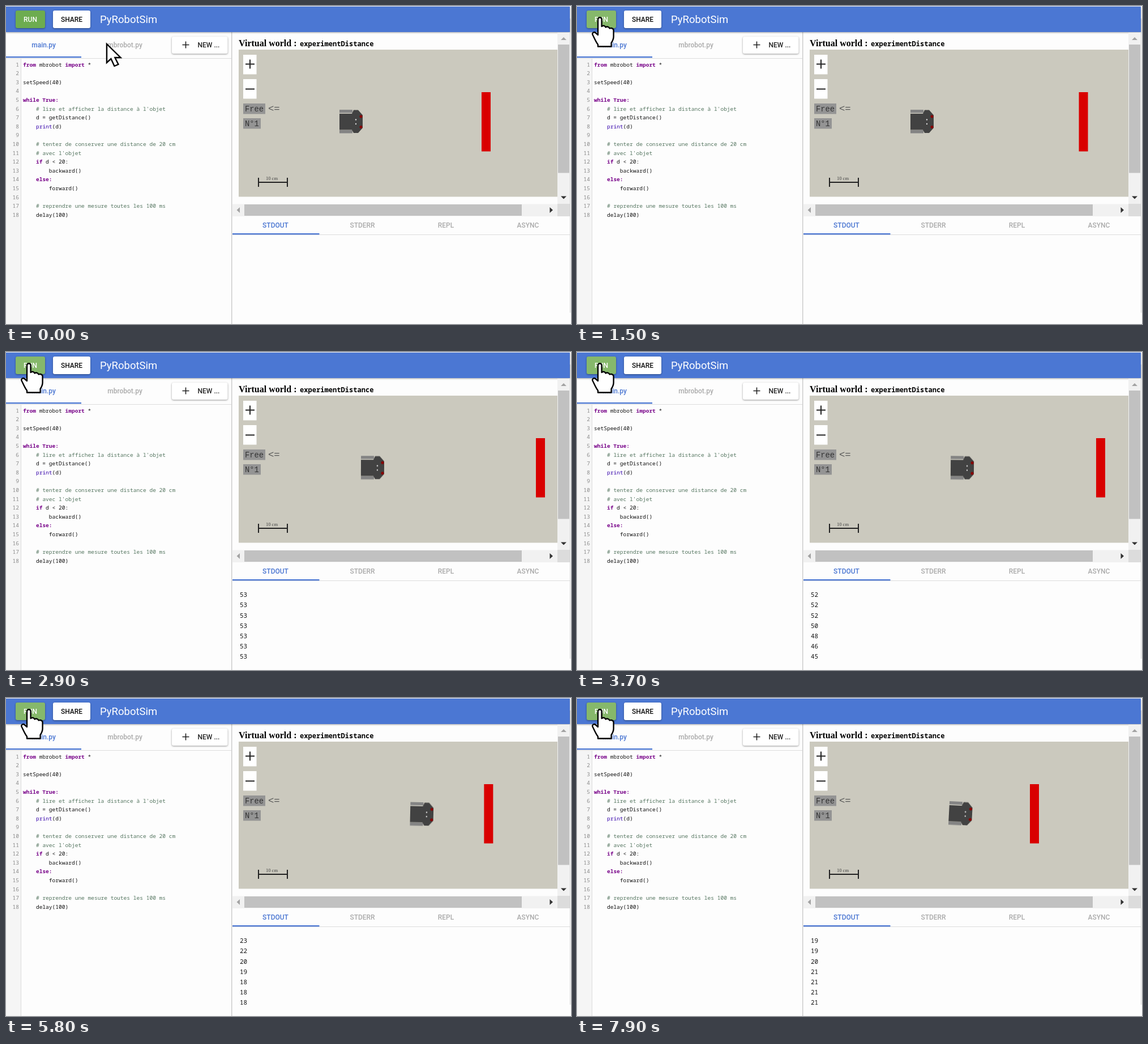
An HTML page that plays this animation: 998 by 561 pixels, repeating every 8000 ms.

```html
<!DOCTYPE html>
<html lang="en">
<head>
<meta charset="utf-8">
<title>PyRobotSim</title>
<style>
html, body { margin: 0; width: 100%; height: 100%; overflow: hidden; background: #fdfdfd; }
#stage { position: absolute; left: 0; top: 0; width: 998px; height: 561px; overflow: hidden; }
svg, pre { position: absolute; left: 0; top: 0; margin: 0; }
.ui { font: 500 12px Roboto, sans-serif; text-anchor: middle; }
.mono { font-family: "Noto Sans Mono", monospace; }
.tag { font: 13.8px "Liberation Mono", monospace; fill: #333; }
.blue { fill: #4a76d2; }
.grey { fill: #aaa; }
.raised { filter: drop-shadow(0 1px 1.5px rgba(0, 0, 0, .4)); }

pre { font: 9.55px/15.59px "Noto Sans Mono", monospace; color: #111; }
#lines { top: 95.7px; width: 23px; text-align: right; color: #8c8c8c; }
#code { top: 95.7px; left: 30px; }
#code b { color: #708; }
#code i { color: #54755f; font-style: normal; }
#code u { color: #30a; text-decoration: none; }
#out { left: 413px; font-size: 10.9px; line-height: 18.2px; }

#wall, #robot, #cursor, #arrow, #hand, #run, #share { animation: 8s linear infinite; }
#wall { animation-name: wall; }
#robot { animation-name: robot; transform-origin: 609.5px 204px; }
#cursor { animation-name: cursor; }
#arrow { animation-name: arrow; }
#hand { animation-name: hand; }
#run { animation-name: run; }
#share { animation-name: share; }

@keyframes wall {
  0% { transform: translateX(840px); }
  10% { transform: translateX(865.3px); }
  11.25% { transform: translateX(869.5px); }
  22.5% { transform: translateX(895px); }
  27.5% { transform: translateX(907px); }
  33.75% { transform: translateX(928px); }
  36.88%, 39.38% { transform: translateX(938px); }
  45% { transform: translateX(921.5px); }
  46.25% { transform: translateX(917px); }
  56.25% { transform: translateX(889.5px); }
  62.5% { transform: translateX(871px); }
  67.5% { transform: translateX(858px); }
  78.75% { transform: translateX(827.5px); }
  83.75% { transform: translateX(812.3px); }
  88.13%, 100% { transform: translateX(800px); }
}
@keyframes robot {
  0%, 24.75% { transform: none; }
  27.5% { transform: translate(9px, 0); }
  46.25% { transform: translate(71px, .5px) rotate(.4deg); }
  62.5% { transform: translate(122px, 1px) rotate(1deg); }
  67.96% { transform: translate(139.5px, 1.2px) rotate(1.2deg); }
  83.75% { transform: translate(89px, .6px) rotate(1.8deg); }
  93.75% { transform: translate(58px, 0) rotate(2.6deg); }
  98.75%, 100% { transform: translate(68px, 0) rotate(3deg); }
}
@keyframes cursor {
  0% { transform: translate(178px, 67px); }
  3.75% { transform: translate(154px, 52px); }
  7.5% { transform: translate(88px, 18px); }
  10% { transform: translate(5px, -3px); }
  11.25% { transform: translate(22px, 9px); }
  12.5%, 100% { transform: translate(40px, 20px); }
}
@keyframes arrow { 0% { opacity: 1; animation-timing-function: step-end; } 12%, 100% { opacity: 0; } }
@keyframes hand { 0% { opacity: 0; animation-timing-function: step-end; } 12%, 100% { opacity: 1; } }
@keyframes run {
  0%, 11.25% { fill: #6dac50; }
  14.5%, 23% { fill: #86b86b; }
  25.5%, 28% { fill: #98c47e; }
  33%, 100% { fill: #86b86b; }
}
@keyframes share {
  0%, 5.5% { fill: #fff; }
  8.5%, 10% { fill: #ececec; }
  12.5%, 100% { fill: #fff; }
}
</style>
</head>
<body>
<div id="stage">
<svg width="998" height="561" viewBox="0 0 998 561">
  <!-- editor pane -->
  <path fill="#f5f5f5" d="M0 93H27V561H0Z"/>
  <path stroke="#ddd" d="M26.5 93V561M0 92.5H398M400 403.5H996"/>
  <path stroke="#ccc" stroke-width="1.5" d="M398.7 46V561"/>
  <path stroke="#d5d5d5" d="M996.5 22V541"/>
  <path class="blue" d="M0 89H133V91.3H0ZM400 401H553.500V403.300H400Z"/>
  <g class="ui">
    <text class="blue" x="66.500" y="73">main.py</text>
    <text class="grey" x="210" y="73">mbrobot.py</text>
    <rect class="raised" x="293" y="54" width="98.500" height="30" rx="3" fill="#fff"/>
    <path stroke="#222" stroke-width="1.6" d="M311.500 68.500H323.500M317.500 62.500V74.500"/>
    <text x="358" y="73" fill="#222">NEW ...</text>
    <text class="blue" x="476" y="391">STDOUT</text>
    <text class="grey" x="629.500" y="391">STDERR</text>
    <text class="grey" x="777" y="391">REPL</text>
    <text class="grey" x="922" y="391">ASYNC</text>
  </g>

  <!-- header -->
  <path fill="#4b77d3" d="M0 1H996V46H0Z" style="filter: drop-shadow(0 1px 1.5px rgba(0,0,0,.35))"/>
  <g class="ui">
    <g class="raised">
      <rect id="run" x="17" y="8" width="52" height="31" rx="3" fill="#6dac50"/>
      <rect id="share" x="83" y="8" width="66" height="31" rx="3" fill="#fff"/>
    </g>
    <text x="43" y="27.500" fill="#fff">RUN</text>
    <text x="116" y="27.500" fill="#111">SHARE</text>
  </g>
  <text x="166" y="29.500" fill="#fff" font-family="Roboto, sans-serif" font-size="18.5">PyRobotSim</text>

  <!-- world -->
  <text x="411" y="70.500" font-family="'Liberation Serif', serif" font-weight="700" font-size="16">Virtual world :</text>
  <text class="mono" x="519" y="70.500" font-weight="700" font-size="12.1">experimentDistance</text>
  <path fill="#cbc9be" d="M411 77H974V336.500H411Z"/>
  <path fill="#fff" d="M419 86H442.500V120.500H419ZM419 129H442.500V163.500H419Z"/>
  <path stroke="#222" stroke-width="2" d="M423 102.500H439M431 94.500V110.500M423 146.500H439"/>
  <path fill="#949494" d="M419 172H458V190.500H419ZM419 198H450V216.500H419Z"/>
  <g class="tag">
    <text x="422" y="186">Free</text>
    <text x="422" y="211.500">N°1</text>
    <text x="463" y="186" font-size="17.3" style="font-size:17.3px;fill:#555">&lt;=</text>
  </g>
  <path fill="none" stroke="#222" stroke-width="2" d="M446 303V319M497 303V319M446 311H497"/>
  <text x="469.500" y="306.500" text-anchor="middle" fill="#444" font-family="'Liberation Serif', serif" font-size="8.5">10 cm</text>
  <rect id="wall" y="152" width="16" height="104.500" fill="#d90000"/>
  <g id="robot">
    <path fill="#848484" d="M589 183H612V188.500H589ZM589 219H612V224.500H589Z"/>
    <path fill="#424242" d="M589 190H611L614 183.500H622L630 192.500V215L622 224H614L611 218.500H589Z"/>
    <g fill="#8a0000"><circle cx="627" cy="195" r="2.5"/><circle cx="627" cy="213.500" r="2.5"/></g>
    <g fill="#ddd"><circle cx="618" cy="200.500" r="1.2"/><circle cx="618" cy="208" r="1.2"/></g>
  </g>

  <!-- scrollbars -->
  <path fill="#f1f1f1" d="M974 47H996V349H974ZM400 349.500H974V371H400Z"/>
  <path fill="#c1c1c1" d="M975 68H995V294.500H975ZM421 350H911V370H421Z"/>
  <path fill="#dcdcdc" d="M974 349H996V371H974Z"/>
  <path fill="#a3a3a3" d="M980 60H990L985 55ZM413 355V365L407.500 360Z"/>
  <path fill="#333" d="M980 335.500H990L985 340.500ZM960.500 355V365L966 360Z"/>
</svg>

<pre id="lines"></pre>
<pre id="code"><b>from</b> mbrobot <b>import</b> *

setSpeed(40)

<b>while True:</b>
    <i># lire et afficher la distance à l'objet</i>
    d = getDistance()
    <u>print</u>(d)

    <i># tenter de conserver une distance de 20 cm</i>
    <i># avec l'objet</i>
    <b>if</b> d &lt; 20:
        backward()
    <b>else:</b>
        forward()

    <i># reprendre une mesure toutes les 100 ms</i>
    delay(100)</pre>
<pre id="out"></pre>

<svg width="998" height="561" viewBox="0 0 998 561">
  <g id="cursor" fill="#fff" stroke="#000" stroke-width="2.4">
    <path id="arrow" d="M0 0V33L7.500 26L13.500 39L20.500 36L14.500 24H24.500Z"/>
    <path id="hand" stroke-linejoin="round" d="M-3 27V3.500a3.300 3.300 0 0 1 6.600 0V16c3-2.500 6-1 7 1.500c3-2 6-.5 7 2c4-1.500 7 .5 7 4V34c0 5-2 8-4 11V51.500H-3V48C-7 43-10 35-12.500 30.500C-13.500 27-10 25-7 27.500L-3 31Z"/>
  </g>
</svg>
</div>
<script>
const LOOP = 8000, FIRST = 1870, STEP = 107, ROWS = 7;
const out = document.getElementById('out');
document.getElementById('lines').textContent =
  Array.from({ length: 18 }, (_, i) => i + 1).join('\n');

// Printed distances as [value, repeats]
const runs = [[52, 1], [53, 9], [52, 4], [50], [48], [46], [45], [43], [42], [40], [38],
  [36], [35], [33], [31], [30], [28], [26], [25], [23], [22], [20], [19], [18, 6],
  [19, 12], [20], [21, 4]];
const readings = runs.flatMap(([d, n = 1]) => Array(n).fill(d));

let start, shown = -1;
function tick(now) {
  start ??= now;
  const t = (now - start) % LOOP;
  const count = Math.max(0, Math.floor((t - FIRST) / STEP) + 1);
  if (count !== shown) {
    shown = count;
    out.textContent = readings.slice(0, count).slice(-ROWS).join('\n');
    out.style.top = (count < ROWS ? 428.9 : 419.2) + 'px';
  }
  requestAnimationFrame(tick);
}
requestAnimationFrame(tick);
</script>
</body>
</html>
```
